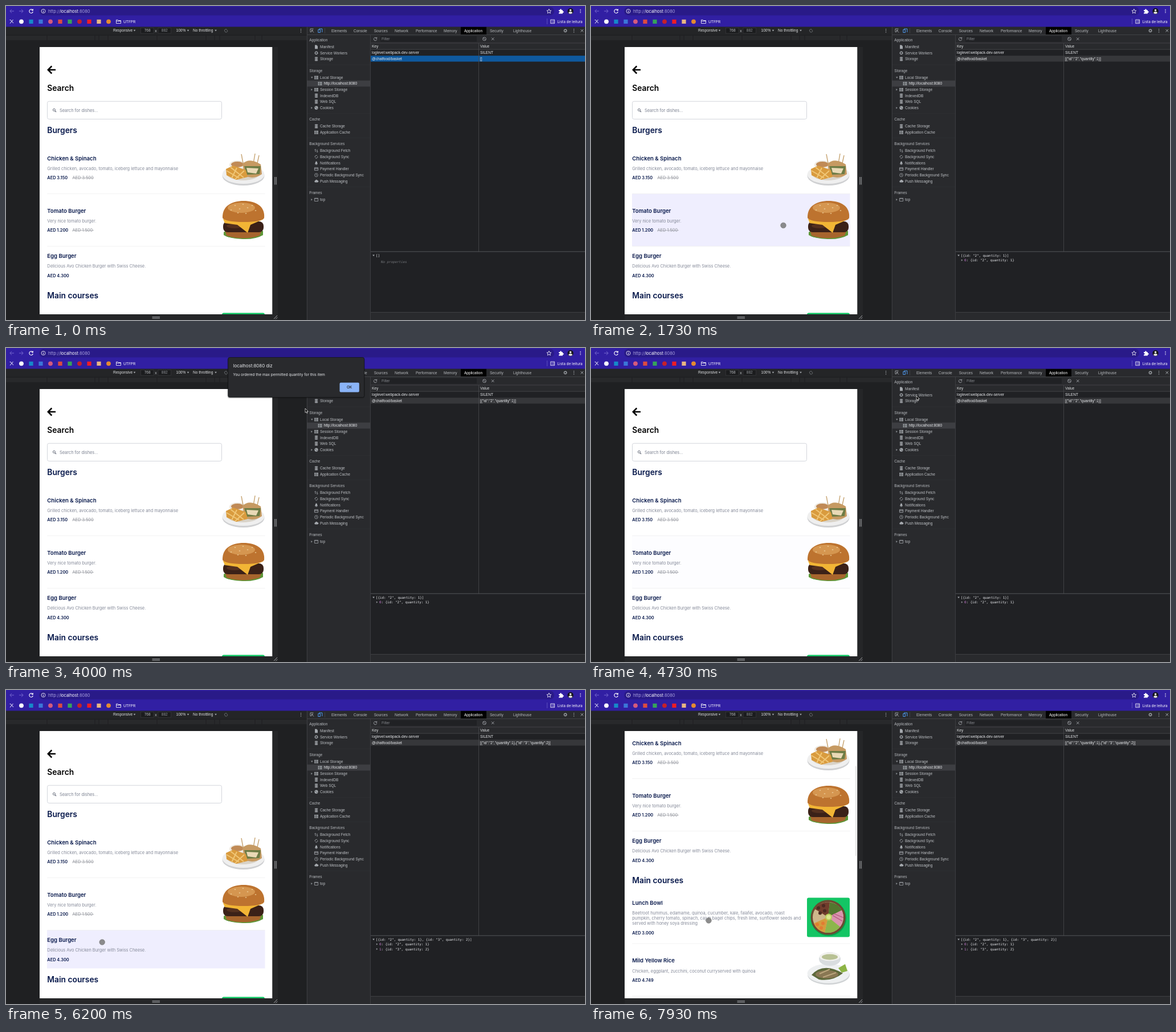
Animation, 1016 px wide and 551 px high, one loop 8000 ms. Source, as an HTML page:

```html
<!DOCTYPE html>
<html lang="pt">
<head>
<meta charset="utf-8">
<title>Basket demo</title>
<style>
html, body { margin: 0; width: 100%; height: 100%; overflow: hidden; background: #202124; }
svg { display: block; width: 100vw; height: 100vh; }
text { white-space: pre; }
.ui { font-family: "Liberation Sans", Arial, sans-serif; }
.in { font-family: Inter, sans-serif; }
.mono { font-family: "DejaVu Sans Mono", monospace; }
</style>
</head>
<body>
<svg id="stage" viewBox="0 0 1016 551" xmlns="http://www.w3.org/2000/svg"></svg>
<script>
const LOOP = 8000;
const NAVY = '#06174a', GREY = '#858a99', ICON = '#a4a8ad';

const rect = (x, y, w, h, fill, more = '') =>
  `<rect x="${x}" y="${y}" width="${w}" height="${h}" fill="${fill}" ${more}/>`;
const dot = (x, y, r, fill, more = '') =>
  `<circle cx="${x}" cy="${y}" r="${r}" fill="${fill}" ${more}/>`;
const oval = (x, y, rx, ry, fill, more = '') =>
  `<ellipse cx="${x}" cy="${y}" rx="${rx}" ry="${ry}" fill="${fill}" ${more}/>`;
const line = (d, color, w = 1, more = '') =>
  `<path d="${d}" fill="none" stroke="${color}" stroke-width="${w}" ${more}/>`;
const shape = (d, fill, more = '') => `<path d="${d}" fill="${fill}" ${more}/>`;
const text = (cls, x, y, size, fill, str, more = '') =>
  `<text class="${cls}" x="${x}" y="${y}" font-size="${size}" fill="${fill}" ${more}>${str.replace(/&/g, '&amp;')}</text>`;
const ui = (x, y, str, fill = '#c3c6ca') => text('ui', x, y, 6.55, fill, str);
const mono = (x, y, str, fill = '#e8eaed', more = '') => text('mono', x, y, 5.83, fill, str, more);
const bold = 'font-weight="600"';
const group = (id, body, more = '') => `<g id="${id}" ${more}>${body}</g>`;
const down = (x, y, fill = ICON) => shape(`M${x - 1.8} ${y - 1.3}h3.6l-1.8 2.8z`, fill);
const right = (x, y, fill = '#8a8d91') => shape(`M${x - 1.2} ${y - 1.8}v3.6l2.6-1.8z`, fill);
const dots = (x, y, fill) => [-2.6, 0, 2.6].map(d => dot(x, y + d, .75, fill)).join('');

function browser() {
  const marks = [[27, '#ffffff'], [44, '#1689c9'], [61, '#3b77d8'], [78, '#d45a7d'], [95, '#dc4b40'],
    [112, '#35a35a'], [129, '#c5202a'], [146, '#f01c24'], [163, '#e9b682'], [180, '#e48a31']];
  return rect(0, 0, 1016, 36.5, '#311fa3') +
    rect(58, 1.5, 904, 15, '#291a88', 'rx="7.5"') +
    line('M14 9H7M10 5.800L6.800 9L10 12.200M23 9h7M27 5.800L30.200 9L27 12.200', '#7668cf', 1) +
    line('M46.600 7A3.300 3.300 0 1 0 47.300 10M47.300 5.300V7.800H44.800', '#fff', 1.1) +
    line('M65.500 8.400V11.200M65.500 6.500V7.400', '#fff', .9) + `<circle cx="65.500" cy="9" r="3.500" fill="none" stroke="#fff" stroke-width=".8"/>` +
    text('in', 74, 12, 7.4, '#aaa2df', 'http://<tspan fill="#fff">localhost</tspan>:8080') +
    line('M952.800 5.200L953.900 7.900L956.700 8.100L954.600 10L955.300 12.800L952.800 11.300L950.300 12.800L951 10L948.900 8.100L951.700 7.900Z', '#fff', .8) +
    shape('M970 7h2.200a1.300 1.300 0 1 1 2.400 0h2.200v2.200a1.300 1.300 0 1 1 0 2.400v1.900h-6.800v-2a1.300 1.300 0 1 0 0-2.500z', '#fff') +
    dot(990.5, 9, 5.2, '#15151b') + dot(990.5, 7.4, 1.8, '#ddd') + oval(990.5, 11.8, 3.2, 2, '#ddd') +
    dots(1008, 9, '#fff') +
    line('M8 24.500L13 30M12.500 24L7 30.500M6.500 24.500h2', '#d4d0f2', 1.1) +
    marks.map(([x, c], i) => i % 3 ? rect(x - 3.6, 23.8, 7.2, 7.2, c) : dot(x, 27.3, 3.9, c)).join('') +
    line('M193.500 24.300h2.800l1 1.200h4.200v5h-8zM193.500 26.500h8', '#fff', .8) +
    text('in', 206, 29.6, 6.5, '#fff', 'UTFPR') +
    line('M949.500 22v10', '#6d5fca', .7) +
    line('M955.700 24h6.800v6.600h-6.800zM957 26h1M959 26h2.500M957 28.500h1M959 28.500h2.500', '#fff', .8) +
    text('in', 967.5, 29.6, 6.4, '#fff', 'Lista de leitura');
}

function deviceBar() {
  let s = rect(0, 36.5, 528, 514.5, '#1f2022') + rect(0, 36.5, 528, 14, '#242527') +
    rect(0, 52, 528, 8, '#28292b') + rect(467.5, 72, 9.5, 479, '#252628') + rect(59, 541, 418, 10, '#252628');
  for (const x of [72, 156, 163, 179, 265, 351, 366, 375, 437, 449]) s += line(`M${x} 52v8`, '#1d1e20', .8);
  s += ui(188, 45.3, 'Responsive', '#dcdee0') + down(225.5, 43) +
    rect(236.5, 38.5, 22.5, 9.5, '#1b1c1e', 'stroke="#3c3d40" stroke-width=".6"') + ui(242.7, 45.3, '768', '#b5b8bc') +
    ui(261.2, 45.5, 'x') +
    rect(267, 38.5, 22.5, 9.5, '#1b1c1e', 'stroke="#3c3d40" stroke-width=".6"') + ui(272.8, 45.3, '882', '#8d9095') +
    ui(298.5, 45.3, '100%', '#dcdee0') + down(319.5, 43) +
    ui(328, 45.3, 'No throttling', '#dcdee0') + down(368, 43) +
    line('M384 41.500L386.500 40.500L389 44L387.500 45.800L385 46L383.200 43Z', '#777a7e', .8) + dots(517.5, 43.3, ICON) +
    line('M471.800 300v13.500M474.200 300v13.500', '#a3a5a8', 1) +
    line('M256.500 545.700h13.500M256.500 548h13.500', '#a3a5a8', 1) +
    line('M470 549L476 543M473.200 549.300L476.200 546.300', '#a3a5a8', 1);
  return s;
}

const icons = {
  doc: x => shape(`M${x + 1}-3.200h3l2 2v4.600h-5z`, ICON),
  gear: x => `<circle cx="${x + 3.5}" cy="0" r="2.300" fill="none" stroke="${ICON}" stroke-width="1.500" stroke-dasharray="1.300 .5"/>` + dot(x + 3.5, 0, 1.9, 'none', `stroke="${ICON}" stroke-width=".8"`),
  db: x => [-2.4, 0, 2.4].map(y => oval(x + 3.5, y, 3, 1.3, ICON, 'stroke="#292a2d" stroke-width=".4"')).join(''),
  grid: x => rect(x, -2.8, 7, 5.8, ICON) + line(`M${x} -.800h7M${x} 1.200h7M${x + 3} -2.800v5.800`, '#292a2d', .6),
  cookie: x => dot(x + 3.5, 0, 3.1, ICON) + dot(x + 2.5, -.8, .7, '#292a2d') + dot(x + 4.5, .9, .7, '#292a2d'),
  swap: x => line(`M${x + 2} 2V-2.800L${x + .6} -1.400M${x + 5} -2V2.800L${x + 6.4} 1.400`, ICON, .9),
  sync: x => line(`M${x + 1.2} .8A2.500 2.500 0 0 1 ${x + 5} -2M${x + 5.8} -.8A2.500 2.500 0 0 1 ${x + 2} 2`, ICON, .9),
  bell: x => shape(`M${x + .8} 2c1.200-1 .700-4.700 2.700-4.900c2 .2 1.500 3.900 2.700 4.900zM${x + 2.7} 2.400h1.600v.9h-1.600z`, ICON),
  card: x => line(`M${x + .4} -2.300h6.200v4.700h-6.200zM${x + .4} -.6h6.200`, ICON, .9),
  clock: x => dot(x + 3.5, 0, 2.9, 'none', `stroke="${ICON}" stroke-width=".8"`) + line(`M${x + 3.5} -1.800V.2L${x + 4.8} 1`, ICON, .7),
  cloud: x => shape(`M${x + 1.6} 2.200a1.700 1.700 0 0 1 0-3.300a2.200 2.200 0 0 1 4-.3a1.800 1.800 0 0 1 0 3.600z`, ICON),
  frame: x => line(`M${x + .4} -2.500h6.200v5.200h-6.200zM${x + .4} -1.700h6.200`, ICON, .8)
};

function sidebar() {
  const heads = [[59.5, 'Application'], [113.3, 'Storage'], [198.8, 'Cache'], [241.8, 'Background Services'], [327.5, 'Frames']];
  const rows = [[71.8, 'doc', 'Manifest'], [82.4, 'gear', 'Service Workers'], [93, 'db', 'Storage'],
    [125.5, 'grid', 'Local Storage', 1], [136.1, 'grid', 'http://localhost:8080', 0, 6.5], [146.7, 'grid', 'Session Storage', 2],
    [157.3, 'db', 'IndexedDB'], [167.9, 'db', 'Web SQL'], [178.7, 'cookie', 'Cookies', 2],
    [211, 'db', 'Cache Storage'], [221.7, 'grid', 'Application Cache'],
    [254, 'swap', 'Background Fetch'], [264.7, 'sync', 'Background Sync'], [275.4, 'bell', 'Notifications'],
    [286, 'card', 'Payment Handler'], [296.7, 'clock', 'Periodic Background Sync'], [307.4, 'cloud', 'Push Messaging'],
    [339.8, 'frame', 'top', 2]];
  return rect(528, 50.5, 111, 500.5, '#292a2d') + rect(528, 130.8, 111, 10.6, '#3d3e42') +
    [103, 188.5, 231.5, 317.5].map(y => line(`M528 ${y}h111`, '#303134', .6)).join('') +
    heads.map(([y, s]) => ui(532.3, y + 2.3, s, '#b6b9bd')).join('') +
    rows.map(([y, icon, s, open, dx = 0]) =>
      `<g transform="translate(0 ${y})">${icons[icon](541 + dx)}${open === 1 ? down(536.8, 0, '#8a8d91') : open === 2 ? right(536.5, 0) : ''}</g>` +
      ui(551 + dx, y + 2.3, s, dx ? '#e8eaed' : '#bdc0c4')).join('');
}

function devtools() {
  const tabs = [[571, 'Elements'], [609.7, 'Console'], [645.7, 'Sources'], [682, 'Network'], [719, 'Performance'],
    [768, 'Memory'], [804, 'Application'], [849, 'Security'], [890, 'Lighthouse']];
  return rect(528, 36.5, 488, 514.5, '#202124') + rect(528, 36.5, 488, 14, '#292a2d') +
    rect(798, 36.5, 45, 13.8, '#000') +
    tabs.map(([x, s]) => ui(x, 45.5, s, x === 804 ? '#fff' : '#b5b8bc')).join('') +
    line('M534 40h5.500M534 40v5.500h2M536.500 42.500L540 46.500M536.500 45v-2.700h2.700', ICON, .9) +
    line('M549 40h5.800v6M547.800 41.500h3.600v5h-3.600z', '#4f9af2', 1) + line('M559.500 39v9', '#4a4c50', .7) +
    `<g transform="translate(978 43.300)">${icons.gear(0)}</g>` + dots(996.5, 43.3, ICON) +
    line('M1008.500 41L1013 45.500M1013 41L1008.500 45.500', ICON, 1) +
    sidebar() + line('M528.300 36.500V551M639.400 50.500V551M528 50.500H1016', '#48494d', .8) +
    rect(640, 51, 376, 14, '#292a2d') +
    line('M650 56.200A2.700 2.700 0 1 0 650.700 58.500M650.700 54.800v2.200h-2.200', ICON, .9) +
    rect(657, 53, 169, 9.6, '#202124') + ui(659, 60.1, 'Filter', '#85888d') +
    dot(839.5, 57.8, 2.9, 'none', `stroke="${ICON}" stroke-width=".9"`) + line('M837.500 55.800l4 4M852 55.500l4.500 4.500M856.500 55.500L852 60', ICON, .9) +
    rect(640, 65, 376, 11, '#292a2d') + ui(642, 72.8, 'Key', '#dcdee0') + ui(832, 72.8, 'Value', '#dcdee0') +
    rect(640, 87.2, 376, 10.4, '#0f599e', 'id="pick"') +
    line('M640 65H1016M640 76.200H1016M829.500 65.200V431', '#494b4f', .8) +
    ui(642, 84.1, 'loglevel:webpack-dev-server', '#e8eaed') + ui(832, 84.1, 'SILENT', '#e8eaed') +
    ui(642, 94.7, '@chatfood/basket', '#e8eaed') + text('ui', 832, 94.7, 6.55, '#e8eaed', '', 'id="value"') +
    line('M640 431H1016', '#55575b', 1) + rect(640, 537.5, 376, 13.5, '#292a2d') + line('M640 537.500H1016', '#494b4f', .7) +
    down(645, 437.7) + text('mono', 649, 439.8, 5.83, '#e8eaed', '', 'id="tree"') +
    group('empty', mono(658, 450.6, 'No properties', '#74777b', 'font-style="italic"')) +
    [['2', 1, 0], ['3', 2, 1]].map(([id, n, i]) => group('entry' + i, right(651, 446 + i * 8.5) +
      mono(655, 448.1 + i * 8.5, `<tspan fill="#c77bd0">${i}</tspan>: {id: "${id}", quantity: <tspan id="count${i}">${n}</tspan>}`))).join('');
}

const photos = {
  sandwich: oval(37.5, 45, 37, 17, '#cfd0d2') + oval(37.5, 42.5, 37, 16.5, '#efefef') + oval(37, 41, 29, 12, '#d9d3c8') +
    oval(27, 26, 14, 8, '#eeeae2') + oval(27, 25, 11, 5, '#c08a56') +
    line('M34 7L38 28M58 6L55 24M65 9L61 27', '#c9a878', 1.5) +
    shape('M36 24Q48 12 68 25L70 42Q56 52 40 45Z', '#c69a62') + shape('M39 28L68 28L66 42L44 43Z', '#6d7c45') +
    shape('M43 31L64 32L60 41L45 39Z', '#e9d9b6') +
    shape('M7 33L20 27L42 35L45 47L25 52L8 44Z', '#d99b3e') +
    line('M8 36L30 49M15 30L38 48M26 31L17 49M39 36L23 51', '#f0c676', 2),
  burger: oval(37, 60, 33, 7, '#3f7426') + shape('M3 56q7-6 12 0t14 1t14 1t14-2t15-2v7q-14 8-36 7t-33-7z', '#5d9637') +
    shape('M5 52h65l-4 10q-29 9-58 0z', '#a7652d') +
    rect(2, 37, 71, 19, '#3b2118', 'rx="8"') + oval(22, 45, 14, 4, '#54301f') +
    shape('M2 33H73L50 43L45 57L27 43L5 40Z', '#f2b535') +
    shape('M1 31C0 10 17 1 38 1S76 10 74 31Q70 38 38 38T1 31Z', '#bd732f') +
    oval(34, 13, 24, 9, '#d59650') +
    [[16, 17], [23, 9], [31, 15], [37, 7], [45, 13], [53, 9], [59, 18], [28, 22], [42, 23]].map(([x, y]) => oval(x, y, 1.3, .8, '#efd3a0')).join(''),
  bowl: rect(0, 0, 75, 69, '#13c564', 'rx="3"') + dot(38, 36, 31, '#0b9c4c') + dot(37, 34.5, 30.5, '#6b4a31') + dot(37, 34.5, 27, '#cdb68b') +
    shape('M37 34L14 20A27 27 0 0 1 40 8Z', '#713d2c') + shape('M37 34L40 8A27 27 0 0 1 61 22Z', '#53772f') +
    shape('M37 34L61 22A27 27 0 0 1 58 51Z', '#d994ad') + shape('M37 34L58 51A27 27 0 0 1 31 61Z', '#8cb64b') +
    shape('M37 34L31 61A27 27 0 0 1 12 45Z', '#d59b3d') +
    [[20, 18], [29, 14], [23, 27], [31, 23], [18, 47], [25, 53], [28, 45]].map(([x, y]) => dot(x, y, 3, y < 30 ? '#4d2a22' : '#e27c32')).join('') +
    dot(38, 34, 6, '#b9cf5c') + dot(38, 34, 3.8, '#dbe78e') + line('M45 31L62 41M47 28L64 35', '#b6537e', 1.3),
  curry: oval(38, 43, 37, 17, '#d0d3d5') + oval(37.5, 40.5, 37, 17, '#eef0f1') +
    oval(40, 15, 19, 12, '#d9dddf') + oval(40, 11, 18, 7.5, '#f2f2ee') + oval(40, 11.5, 14, 5, '#b8c194') +
    shape('M8 43Q28 20 63 40Q44 55 21 51Z', '#5d693b') + oval(35, 42, 20, 7, '#897753') +
    shape('M55 31l12-7l4 12l-10 3z', '#8db445') + line('M22 41l18-8M28 47l23-8', '#bba67d', 2)
};

function item(top, title, desc, price, old, photo, photoY) {
  const last = top + 17.3 + (desc.length - 1) * 9;
  return text('in', 72.3, top, 9.55, NAVY, title, bold) +
    desc.map((s, i) => text('in', 72.3, top + 17.3 + i * 9, 7.4, GREY, s)).join('') +
    text('in', 72.3, last + 16.3, 7.4, NAVY, 'AED ' + price, bold) +
    (old ? text('in', 116.5, last + 16.3, 7.4, '#92959d', 'AED ' + old) + line(`M116.500 ${last + 13.7}h37.500`, '#92959d', .7) : '') +
    (photo ? `<g transform="translate(379 ${photoY})">${photos[photo]}</g>` : '');
}

function page() {
  const body = rect(72, 329.5, 382.5, 92, '#efeefe', 'id="row2"') + rect(72, 421.5, 382.5, 67, '#efeefe', 'id="row3"') +
    line('M87 112H74.500M80.300 105.500L73.800 112L80.300 118.500', '#000', 2.5) +
    text('in', 72.3, 149, 13.8, '#000', 'Search', bold) +
    rect(72.5, 167.3, 306, 31.2, '#fff', 'rx="3" stroke="#cfd2d8" stroke-width=".9"') +
    dot(84.4, 182.3, 2, 'none', 'stroke="#5d6372" stroke-width="1"') + line('M85.900 183.800L88 186', '#5d6372', 1.2) +
    text('in', 94, 186.2, 7.4, '#7b8090', 'Search for dishes...') +
    text('in', 72.3, 223.3, 13.8, NAVY, 'Burgers', bold) +
    [329.5, 421.5, 619, 711].map(y => line(`M72.300 ${y}H454.500`, '#ececee', .7)).join('') +
    item(270.7, 'Chicken & Spinach', ['Grilled chicken, avocado, tomato, iceberg lettuce and mayonnaise'], '3.150', '3.500', 'sandwich', 253) +
    item(362.7, 'Tomato Burger', ['Very nice tomato burger.'], '1.200', '1.500', 'burger', 341) +
    item(441.9, 'Egg Burger', ['Delicious Avo Chicken Burger with Swiss Cheese.'], '4.300') +
    text('in', 72.3, 513, 13.8, NAVY, 'Main courses', bold) +
    item(551, 'Lunch Bowl', ['Beetroot hummus, edamame, quinoa, cucumber, kale, falafel, avocado, roast',
      'pumpkin, cherry tomato, spinach, cajun bagel chips, fresh lime, sunflower seeds and',
      'served with honey soya dressing'], '3.000', '', 'bowl', 538.5) +
    item(652.4, 'Mild Yellow Rice', ['Chicken, eggplant, zucchini, coconut curryserved with quinoa'], '4.749', '', 'curry', 631);
  return `<clipPath id="view"><rect x="59" y="72" width="408.500" height="469"/></clipPath>` +
    `<g clip-path="url(#view)">${rect(59, 72, 408.5, 469, '#fff')}${group('list', body)}` +
    rect(463.7, 75, 2.2, 158, '#b9b9b9', 'rx="1.100" id="thumb"') + '</g>';
}

function dialog() {
  return rect(388.5, 17, 241, 71.5, '#000', 'rx="4" opacity=".2"') +
    rect(389.7, 16.5, 239, 70, '#292a2d', 'rx="3" stroke="#111214" stroke-width=".7"') +
    text('in', 398.5, 34, 7.9, '#e8eaed', 'localhost:8080 diz') +
    text('in', 398.5, 49.4, 6.55, '#e8eaed', 'You ordered the max permitted quantity for this item') +
    rect(585.5, 60.7, 34.3, 16.8, '#8ab4f8', 'rx="2"') +
    text('in', 602.6, 71.4, 6.3, '#202124', 'OK', 'text-anchor="middle" font-weight="500"');
}

const stage = document.getElementById('stage');
stage.innerHTML = deviceBar() + page() + devtools() + browser() + group('alert', dialog()) +
  dot(0, 0, 4.8, '#808080', 'id="touch" opacity=".9" stroke="#666" stroke-width=".6"') +
  shape('M0 0V7.400L1.700 5.900L2.900 8.500L4.100 8L3 5.400H5.300Z', '#000', 'id="arrow" stroke="#fff" stroke-width=".7"');

const $ = id => document.getElementById(id);
const show = (id, on) => $(id).setAttribute('opacity', +on);
const put = (id, s) => { if ($(id).textContent !== s) $(id).textContent = s; };

// Eased value along [time, value] keys
function track(keys, t) {
  let i = 0;
  while (i < keys.length - 1 && t >= keys[i + 1][0]) i++;
  const [t0, a] = keys[i], [t1, b] = keys[i + 1] || keys[i];
  if (t <= t0 || t1 === t0) return a;
  const k = (t - t0) / (t1 - t0);
  return a + (b - a) * k * k * (3 - 2 * k);
}

const path = [[930, 560, 300], [1330, 337.5, 385], [1730, 337.5, 385], [2130, 312, 379], [2870, 312, 379],
  [3600, 500, 120], [3870, 500, 120], [4000, 525, 106], [4350, 600, 70], [4530, 600, 70], [4670, 571, 84],
  [4730, 571, 84], [5130, 168.7, 442.5], [6270, 168.7, 442.5], [6930, 174, 419.5], [7670, 206.5, 404.5]];
const pathX = path.map(p => [p[0], p[1]]), pathY = path.map(p => [p[0], p[2]]);
const scroll = [[6530, 0], [6930, 66.5], [7070, 84], [7130, 84], [7670, 173], [7870, 173], [7930, 174]];
const glow2 = [[1470, 0], [1560, 1], [1860, 1], [2130, 0], [4600, 0], [4670, .12], [4760, .12], [5000, 0]];
const glow3 = [[5400, 0], [5490, 1], [5650, 1], [5790, .2], [5880, 1], [6230, 1], [6480, 0]];
const thumbFade = [[6530, 0], [6600, .8], [7670, .8], [7930, .35]];

function draw(t) {
  const x = track(pathX, t), y = track(pathY, t), top = track(scroll, t);
  const inPage = x > 59 && x < 467 && y > 72;
  $('touch').setAttribute('transform', `translate(${x} ${y})`);
  $('arrow').setAttribute('transform', `translate(${x} ${y})`);
  show('touch', t >= 930 && inPage ? .9 : 0);
  show('arrow', t >= 930 && !inPage);

  $('list').setAttribute('transform', `translate(0 ${-top})`);
  $('thumb').setAttribute('y', 75 + top * .335);
  show('thumb', track(thumbFade, t));
  show('row2', track(glow2, t));
  show('row3', track(glow3, t));
  show('alert', t >= 2930 && t < 4600);

  const n2 = t >= 1600 ? 1 : 0, n3 = t >= 5930 ? 2 : t >= 5530 ? 1 : 0;
  const basket = [['2', n2], ['3', n3]].filter(b => b[1]);
  put('value', '[' + basket.map(([id, n]) => `{"id":"${id}","quantity":${n}}`).join(',') + ']');
  put('tree', '[' + basket.map(([id, n]) => `{id: "${id}", quantity: ${n}}`).join(', ') + ']');
  put('count1', String(n3));
  show('empty', !n2);
  show('entry0', n2);
  show('entry1', n3 > 0);
  $('pick').setAttribute('fill', n2 ? '#36373a' : '#0f599e');
}

const start = performance.now();
function tick() {
  draw((performance.now() - start) % LOOP);
  requestAnimationFrame(tick);
}
draw(0);
requestAnimationFrame(tick);
</script>
</body>
</html>
```
